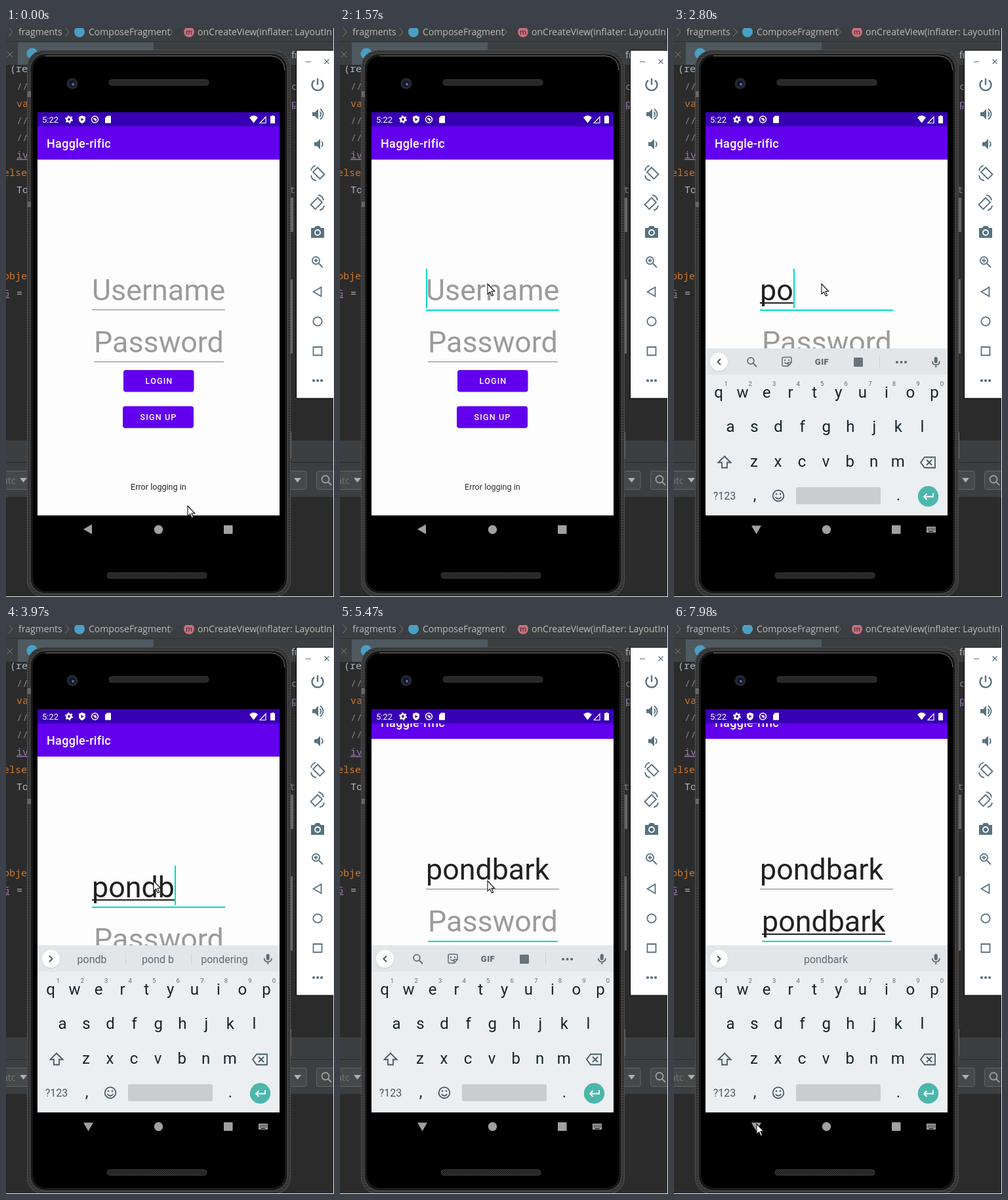
An HTML page for the animation above (8000 ms loop, 500x865 px).

```html
<!DOCTYPE html>
<html lang="en">
<head>
<meta charset="utf-8">
<title>Login on an emulator</title>
<style>
html, body { margin: 0; width: 100%; height: 100%; overflow: hidden; background: #2b2b2b; }
svg { display: block; width: 500px; height: 865px; }
text { font-family: Roboto, sans-serif; white-space: pre; }
.ui { font: 14px "Open Sans", "Noto Sans", sans-serif; fill: #bbb; }
.code text { font: 15px "Noto Sans Mono", "DejaVu Sans Mono", monospace; fill: #a9b7c6; }
.code .kw { fill: #cc7832; }
.code .rem { fill: #808080; }
.code .var { fill: #9876aa; text-decoration: underline; }
.big { font-size: 44.8px; fill: #212121; }
.hint { fill: #9b9b9b; }
.btn { font-size: 12.6px; font-weight: 500; letter-spacing: 1.12px; fill: #fff; text-anchor: middle; }
.key { font-size: 24px; fill: #14252e; text-anchor: middle; }
.num { font-size: 9.5px; fill: #5a6870; text-anchor: middle; }
.word { font-size: 16px; fill: #5f6b73; text-anchor: middle; }
.line { fill: none; stroke-width: 1.8; }
</style>
</head>
<body>
<svg viewBox="0 0 500 865">
  <defs>
    <clipPath id="screen"><path d="M48 128h369v613H48z"/></clipPath>
    <pattern id="mesh" width="3" height="3" patternUnits="userSpaceOnUse">
      <path d="M0 0h3v3H0z" fill="#333"/><path d="M0 3 3 0" stroke="#111"/>
    </pattern>
    <pattern id="rim" width="8" height="4" patternUnits="userSpaceOnUse">
      <path d="M0 0h8v4H0z" fill="#303030"/><path d="M0 1h8" stroke="#484848"/>
    </pattern>
  </defs>

  <!-- editor behind the phone -->
  <g>
    <path d="M0 0h500v865H0z" fill="#2b2b2b"/>
    <path d="M0 0h500v56H0z" fill="#3c3f41"/>
    <path d="M0 20.5h500" stroke="#2f3234"/>
    <path d="M18 22h207v34H18z" fill="#4e5a60"/>
    <path d="m2 36 8 8m0-8-8 8" stroke="#777"/>
    <circle cx="40" cy="39" r="8.5" fill="#4a9fc4"/>
    <path d="m4-1 6 7-6 7m86-14 6 7-6 7m158-14 6 7-6 7" class="line" stroke="#777" style="stroke-width:1"/>
    <circle cx="112" cy="6" r="8" fill="#4a9fc4"/>
    <circle cx="279" cy="6" r="8" fill="#c4707c"/>
    <text x="279" y="10" text-anchor="middle" font-size="11" fill="#3a2528">m</text>
    <g class="ui">
      <text class="ui" x="19" y="11">fragments</text>
      <text class="ui" x="126" y="11">ComposeFragment</text>
      <text class="ui" x="292" y="11">onCreateView(inflater: LayoutIn</text>
      <text class="ui" x="435" y="46">fr</text>
    </g>
    <g class="code">
      <text x="6" y="67">(re</text>
      <text class="rem" x="16" y="94">//</text><text class="rem" x="435" y="94">c</text>
      <text class="kw" x="16" y="120">va</text><text class="var" x="435" y="120">p</text>
      <text class="rem" x="16" y="146">//</text>
      <text class="rem" x="16" y="172">//</text>
      <text class="var" x="16" y="198">iv</text>
      <text class="kw" x="-4" y="225">else</text>
      <text x="16" y="251">To</text><text x="432" y="251" style="fill:#6a8759">t</text>
      <text class="kw" x="-4" y="382">obje</text>
      <text class="var" x="-4" y="408">G</text><text x="16" y="408">=</text>
    </g>
    <path d="M0 627h500v86H0z" fill="#3c3f41"/>
    <path d="M0 660.5h500" stroke="#292b2d"/>
    <g fill="#45494a" stroke="#646464">
      <rect x="-5" y="673.500" width="42" height="28" rx="3"/>
      <rect x="420" y="673.500" width="38" height="28" rx="3"/>
      <rect x="473.500" y="673.500" width="40" height="28" rx="3"/>
    </g>
    <text class="ui" x="-5" y="693" style="fill:#777">atc</text>
    <path d="M21 684h11l-5.500 7zM439 684h11l-5.500 7z" fill="#adb0b2"/>
    <circle cx="487" cy="686" r="5.500" class="line" stroke="#9da0a2"/>
    <path d="m491 690 5 5" class="line" stroke="#9da0a2"/>
  </g>

  <!-- phone body -->
  <path d="M433 258h5v52h-5zm0 124h4v113h-4zM433 614h2v41h-2z" fill="#666"/>
  <rect x="32.500" y="34" width="401" height="831" rx="25" fill="url(#rim)" stroke="#505050"/>
  <rect x="37" y="39" width="392" height="821" rx="23" fill="#181818" stroke="#555"/>
  <rect x="41" y="43" width="384" height="813" rx="20"/>
  <path d="M60 42.500H404Q424 44 425 64" class="line" stroke="#777" style="stroke-width:1"/>
  <path d="M33 264h5v8h-5zm0-168h5v9h-5z" fill="#666"/>
  <circle cx="101" cy="84.500" r="8.500" fill="#25272a"/>
  <circle cx="101" cy="84.500" r="4.500" fill="#10142b"/>
  <circle cx="102" cy="85.500" r="2" fill="#6068b0"/>
  <g fill="url(#mesh)" stroke="#3b3b3b">
    <rect x="157" y="78.500" width="152" height="8.500" rx="4"/>
    <rect x="154" y="828" width="152" height="8.500" rx="4"/>
  </g>

  <g clip-path="url(#screen)">
    <path d="M48 128h369v613H48z" fill="#fdfdfd"/>
    <g id="app">
      <path d="M48 200h369v2H48z" opacity=".07"/>
      <path d="M48 149h369v51H48z" fill="#6200ee"/>
      <text x="62" y="182" font-size="18" font-weight="500" letter-spacing=".3" fill="#fff">Haggle-rific</text>
      <g id="fields"></g>
      <path d="M181 521h104v33.500H181zM180 576h104v33.500H180z" fill="#000" opacity=".15"/>
      <rect x="179" y="520" width="107.500" height="33" rx="3.500" fill="#6200ee"/>
      <rect x="178" y="575" width="108" height="33" rx="3.500" fill="#6200ee"/>
      <text class="btn" x="233.500" y="541">LOGIN</text>
      <text class="btn" x="232.500" y="596">SIGN UP</text>
    </g>
    <text id="toast" x="190" y="702" font-size="12.600" fill="#222">Error logging in</text>

    <path d="M48 128h369v21.500H48z" fill="#3700b3"/>
    <text x="55" y="144" font-size="13" fill="#fff">5:22</text>
    <g fill="#fff">
      <circle cx="96" cy="139" r="3.200" fill="none" stroke="#fff" stroke-width="2.600"/>
      <circle cx="96" cy="139" r="5" fill="none" stroke="#fff" stroke-width="2" stroke-dasharray="2.400 2.836"/>
      <path d="m116 133 5 2v4q0 4-5 6-5-2-5-6v-4z"/>
      <path d="m114.500 136.500 4 2.500-4 2.500z" fill="#3700b3"/>
      <circle cx="135.500" cy="139" r="5" fill="none" stroke="#fff" stroke-width="1.500"/>
      <path d="M132.500 137h4l2 3-2 2z"/>
      <path d="M154 133.500h6v11h-9v-8z"/>
      <path d="M371 136q6.500-6 13 0l-6.500 8.500zM405 133h3v1h2v11h-7v-11h2z"/>
      <path d="M387 144.500h9v-9.500z" fill="none" stroke="#fff" stroke-width="1.200"/>
    </g>
    <g id="keyboard">
      <path d="M48 487h369v254H48z" fill="#eceff1"/>
      <path d="M48 487h369v40H48z" fill="#e2e6e9"/>
      <circle cx="68.500" cy="508" r="14" fill="#bcc2c6"/>
      <circle cx="68.500" cy="507.500" r="13.700" fill="#fff"/>
      <path id="chevron" class="line" stroke="#444f55"/>
      <g id="tools" class="line" stroke="#5f6b73">
        <circle cx="117" cy="506" r="4.800"/><path d="m120.500 509.500 5.500 5.500"/>
        <path d="M167 500.500h10q2 0 2 2v6l-5 5.500h-7q-2 0-2-2v-9.500q0-2 2-2zM179 508.500h-5v5.500M168.500 508q3 4 5 1" stroke-width="1.500"/>
        <path d="M168 504h2v2h-2zm6 0h2v2h-2z" fill="#5f6b73" stroke="none"/>
        <text x="225.500" y="512" font-size="13" font-weight="900" letter-spacing=".5" text-anchor="middle" fill="#5f6b73" stroke="none">GIF</text>
        <rect x="274" y="501" width="14" height="14" rx="1.500" fill="#68747b" stroke="none"/>
        <path d="M313.500 498v19" stroke="#cdd2d5" style="stroke-width:1"/>
        <path d="M340 508h.1m6.400 0h.1m6.400 0h.1" stroke-width="4" stroke-linecap="round" style="stroke-width:4"/>
      </g>
      <g id="words">
        <path id="bars" d="M182.500 499v18m100-18v18" stroke="#cdd2d5"/>
        <text class="word" x="131" y="514"></text>
        <text class="word" x="231.500" y="514"></text>
        <text class="word" x="333" y="514"></text>
      </g>
      <rect x="396.700" y="500" width="5" height="9.500" rx="2.500" fill="#5f6b73"/>
      <path d="M393.800 506.500q0 5.500 5.500 5.500t5.500-5.500M399.300 512v4" class="line" stroke="#5f6b73"/>
      <g id="keys"></g>
      <g class="line" stroke="#455a64">
        <path d="m77 651 9.500 9.500H81v8h-8v-8h-5.500z"/>
        <path d="M382 652.500h16v16h-16l-6-8zM385 656.500l8 8m0-8-8 8"/>
        <circle cx="159" cy="711" r="8.300"/>
        <path d="M154.500 713q4.500 5.500 9 0"/>
        <path d="M156 708.500h.1m5.800 0h.1" stroke-linecap="round" style="stroke-width:2.600"/>
      </g>
      <text x="77" y="717" font-size="16" text-anchor="middle" fill="#455a64">?123</text>
      <rect x="186" y="698" width="129" height="26" rx="2.500" fill="#c9cdd0"/>
      <circle cx="387.500" cy="712" r="15.700" fill="#4db6ac"/>
      <path d="M395 707v5.500h-14m4.500-4.500-4.500 4.500 4.500 4.500" class="line" stroke="#fff"/>
    </g>
  </g>

  <!-- navigation bar -->
  <g fill="#a0a0a0">
    <path id="back" d="M118 762 131 754.500v15z"/>
    <circle cx="232.500" cy="762.500" r="6.700"/>
    <path d="M332 756h13.500v13H332z"/>
    <g id="switcher"><path d="M385 758h14v9h-14z"/><path d="M387 760.500h11m-11 2.500h11" stroke="#000" stroke-width="1.300" stroke-dasharray="1 1.400"/><path d="M388.500 765.500h7" stroke="#000"/></g>
  </g>

  <!-- emulator controls -->
  <path d="M442.500 34h57v529h-57z" fill="#fff" stroke="#000"/>
  <g class="line" stroke="#58727f">
    <path d="M457 51.500h8M485.500 47.500l7 7m0-7-7 7" style="stroke-width:1.200"/>
    <path d="M470 79.500a8.500 8.500 0 1 0 10 0M475 76.500v10" style="stroke-width:2.400"/>
    <path d="M467 128v6h4l5 5v-16l-5 5zM470 173.500v6h4l5 5v-16l-5 5z" fill="#58727f" stroke="none"/>
    <path d="M478.500 127q3.500 4 0 8M479 123q9 8 0 16M481 172.500q3.500 4 0 8"/>
    <g id="rotate"><path d="m475 212 10.500 10.500-7 7L468 219zM465 224q1 7 8 8m-8-15q1-6 7-8"/></g>
    <path d="m475 258-10.500 10.500 7 7L482 265zM485 270q-1 6-7 7m6-15q-1-7-8-8"/>
    <path d="M465 304h5l2-3h6l2 3h5v15h-20z" fill="#58727f" stroke="none"/>
    <circle cx="475" cy="311" r="4" stroke="#fff"/>
    <circle cx="472.500" cy="353.500" r="5.600"/><path d="m477 358 6 6M469.500 353.500h6m-3-3v6"/>
    <path d="m468.500 401 12-7v14z"/>
    <circle cx="475" cy="446" r="6.700"/>
    <path d="M468.500 485h13v12.500h-13z"/>
    <path d="M469 536h.1m5.900 0h.1m5.900 0h.1" stroke-linecap="round" style="stroke-width:4.200"/>
  </g>
  <path d="M499.500 0v865M0 864.500h500" stroke="#e8e8e8"/>
  <path id="mouse" d="M.5.500v15.500l3.600-3.300 2.600 6 2.400-1-2.600-5.900h4.700z" fill="#fff" stroke="#111" stroke-width="1.100"/>
</svg>
<script>
const LOOP = 8000, PAN = 27, WORD = "pondbark", TEAL = "#03dac5";
const $ = id => document.getElementById(id);

// Pointer stops: time, x, y
const PATH = [
  [230, 276.5, 726], [430, 345, 849], [540, 431, 845], [620, 392, 725], [700, 300, 635],
  [780, 248, 500], [850, 224.5, 440], [1030, 224.5, 404], [1150, 224.5, 388.5],
  [7710, 224.5, 388.5], [7980, 125.5, 758]
];
const CARET = [[1390, 1900], [2350, 3630], [3970, 4950], [4980, 5470], [5970, 7790]];
const FIELDS = [
  { hint: "Username", x: 131, w: 203, base: 414, focus: [1210, 4980],
    typed: [2740, 2800, 3010, 3130, 3970, 4120, 4370, 4460] },
  { hint: "Password", x: 134, w: 198, base: 493, focus: [4980, LOOP],
    typed: [6120, 6340, 6490, 6580, 6740, 6890, 7200, 7290] }
];
// Suggestions by number of typed letters
const WORDS = [
  [], ["p", "people", "put"], ["po", "power", "post"], ["pon", "pond", "pony"],
  ["pond", "ponds", "Pond"], ["pondb", "pond b", "pondering"],
  ["pondba", "pond bar", "pond basin"], ["pondbar", "pond bar", "pond barge"], ["", WORD, ""]
];

const clamp = v => Math.max(0, Math.min(1, v));
const ramp = (t, a, b) => clamp((t - a) / (b - a));
const within = (t, [a, b]) => t >= a && t < b;
const show = (el, on) => el.style.display = on ? "" : "none";

function addKeys() {
  const key = (c, x, y) => `<text class="key" x="${x}" y="${y}">${c}</text>`;
  const row = (s, x, y) => [...s].map((c, i) => key(c, x + i * 36.55, y)).join("");
  const nums = [..."1234567890"].map((c, i) =>
    `<text class="num" x="${79.5 + i * 36.55}" y="543.500">${c}</text>`).join("");
  $("keys").innerHTML = row("qwertyuiop", 68, 562) + row("asdfghjkl", 86, 614) +
    row("zxcvbnm", 122, 667) + nums + key(",", 123, 718) + key(".", 342, 718);
}

function addFields() {
  $("fields").innerHTML = FIELDS.map(f => `<g>
    <text class="big" x="${f.x}" y="${f.base}"></text>
    <rect x="${f.x}" y="${f.base + 3}" height="2" fill="#212121"/>
    <rect x="${f.x}" width="${f.w}"/>
    <rect y="${f.base - 48}" width="2" height="60" fill="${TEAL}"/></g>`).join("");
  FIELDS.forEach((f, i) => [f.text, f.mark, f.line, f.caret] = $("fields").children[i].children);
}

function drawField(f, t) {
  const n = f.typed.filter(s => t >= s).length;
  const focused = within(t, f.focus);
  f.text.textContent = n ? WORD.slice(0, n) : f.hint;
  f.text.classList.toggle("hint", !n);
  const width = n ? f.text.getComputedTextLength() : 0;
  f.mark.setAttribute("width", width);
  show(f.mark, focused && n);
  f.line.setAttribute("y", f.base + 14);
  f.line.setAttribute("height", focused ? 2 : 1);
  f.line.setAttribute("fill", focused ? TEAL : "#7d7d7d");
  f.caret.setAttribute("x", Math.round(f.x + width));
  show(f.caret, focused && CARET.some(c => within(t, c)));
  return n;
}

function drawStrip(n) {
  const words = WORDS[n];
  show($("tools"), !n);
  show($("words"), n);
  show($("bars"), n < WORD.length);
  [...$("words").querySelectorAll("text")].forEach((el, i) => el.textContent = words[i] || "");
  $("chevron").setAttribute("d", n ? "m66 503 4.500 4.500-4.500 4.500" : "m71 503-4.500 4.500 4.500 4.500");
}

function pointer(t) {
  const i = PATH.findIndex(p => p[0] > t);
  if (i === 0) return PATH[0].slice(1);
  if (i < 0) return PATH[PATH.length - 1].slice(1);
  const [a, b] = [PATH[i - 1], PATH[i]], k = ramp(t, a[0], b[0]);
  return [a[1] + (b[1] - a[1]) * k, a[2] + (b[2] - a[2]) * k];
}

function draw(t) {
  const [user, pass] = FIELDS.map(f => drawField(f, t));
  const n = within(t, [3010, 5070]) ? user : pass;
  drawStrip(n);

  const pan = 1 - (1 - ramp(t, 4950, 5190)) ** 2;
  $("app").setAttribute("transform", `translate(0 ${t < 4980 ? 0 : -PAN * pan})`);
  $("toast").setAttribute("opacity", 1 - ramp(t, 1550, 1900));

  const turn = ramp(t, 2060, 2340);
  $("back").setAttribute("transform", `rotate(${-90 * turn} 125.500 762)`);
  $("switcher").setAttribute("opacity", turn);

  const rise = ramp(t, 2470, 2560);
  show($("keyboard"), t >= 2500);
  $("keyboard").setAttribute("opacity", rise);
  $("keyboard").setAttribute("transform", `translate(0 ${40 * (1 - rise) ** 2})`);
  $("mouse").setAttribute("transform", `translate(${pointer(t)})`);
}

addKeys();
addFields();
const start = performance.now();
function tick() {
  draw((performance.now() - start) % LOOP);
  requestAnimationFrame(tick);
}
tick();
</script>
</body>
</html>
```
